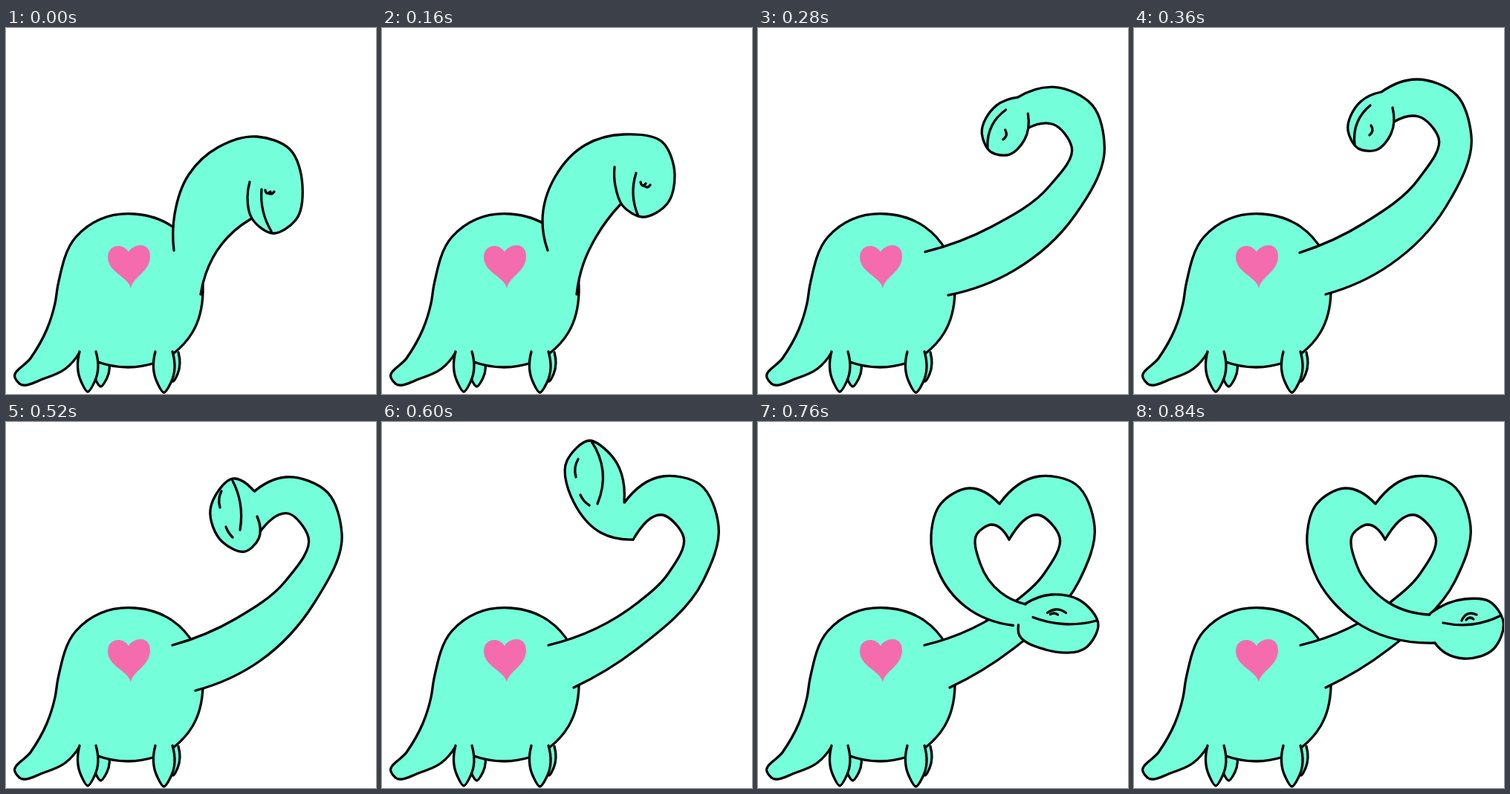
These frames come from a looping animation (498 px wide and 492 px high, 1.4 s). An HTML page:

```html
<!DOCTYPE html>
<html lang="en">
<head>
<meta charset="utf-8">
<title>Dinosaur heart</title>
<style>
html, body { margin: 0; width: 100%; height: 100%; overflow: hidden; background: #fff; }
svg { display: block; width: 100%; height: 100%; }
.skin { fill: #74ffda; stroke: #74ffda; stroke-width: 1; }
.line { fill: none; stroke: #000; stroke-width: 3.3; stroke-linecap: round; stroke-linejoin: round; }
</style>
</head>
<body>
<svg viewBox="0 0 498 492">
  <g id="body"></g>
  <g id="neck"></g>
  <path fill="#f46cae" d="M168 350C165 334 137 329 137 308C137 291 157 288 165 301C172 289 194 287 194 307C194 328 170 335 168 350Z"/>
</svg>
<script>
const LOOP = 1400;

const points = text => text.split(' ').map(p => p.split(',').map(Number));
const mix = (a, b, t) => a.map((v, i) => v + (b[i] - v) * t);
const add = (a, b, k) => a.map((v, i) => v + b[i] * k);

// Smooth curve through key points; tangents follow the chord lengths.
function spline(pts) {
  const n = pts.length - 1;
  const h = [], slope = [];
  for (let i = 0; i < n; i++) {
    const d = add(pts[i + 1], pts[i], -1);
    h[i] = Math.hypot(...d) || 1;
    slope[i] = d.map(v => v / h[i]);
  }
  const tan = pts.map((p, i) =>
    i && i < n ? mix(slope[i - 1], slope[i], h[i - 1] / (h[i - 1] + h[i])) : null);
  tan[0] = mix(tan[1], slope[0], 2);
  tan[n] = mix(tan[n - 1], slope[n - 1], 2);
  return h.map((len, i) =>
    `C${add(pts[i], tan[i], len / 3)} ${add(pts[i + 1], tan[i + 1], -len / 3)} ${pts[i + 1]}`).join('');
}

const stroke = pts => `<path class="line" d="M${pts[0]}${spline(pts)}"/>`;

// A part is a list of curves: joined for the fill, stroked one by one.
function drawPart(curves) {
  const d = curves.map((c, i) => (i ? 'L' : 'M') + c[0] + spline(c)).join('');
  return `<path class="skin" d="${d}Z"/>` + curves.map(stroke).join('');
}

const pose = (parts, marks) => ({
  parts: parts.map(p => p.map(points)),
  marks: marks.map(points)
});

const mapPoints = (v, fn) => Array.isArray(v[0]) ? v.map(w => mapPoints(w, fn)) : fn(v);

const mid = (a, b) => Array.isArray(a) ? a.map((v, i) => mid(v, b[i])) : (a + b) / 2;

const between = (p, q) => ({ parts: mid(p.parts, q.parts), marks: mid(p.marks, q.marks) });

// Swing a whole pose around the shoulder.
function turn(p, degrees) {
  const a = degrees * Math.PI / 180, cx = 240, cy = 330;
  const spin = ([x, y]) => [
    cx + (x - cx) * Math.cos(a) - (y - cy) * Math.sin(a),
    cy + (x - cx) * Math.sin(a) + (y - cy) * Math.cos(a)
  ];
  return { parts: mapPoints(p.parts, spin), marks: mapPoints(p.marks, spin) };
}

const render = p => p.parts.map(drawPart).join('') + p.marks.map(stroke).join('');

const leg = (x, y, w, h) => drawPart([
  [[0, 0], [.1, .75], [.5, 1], [.92, .75], [1, 0]].map(([u, v]) => [x + u * w, y + v * h])
]);

const torso = [
  '99,436 80,458 52,471 18,478 12,470 33,444 55,405 66,370 70,345 94,281 127,257 173,250 224,267 253,299 265,355 251,409 226,437',
  '201,450 165,456 121,448'
].map(points);

const rest = pose([[
  '226,299 227,250 246,197 286,160 338,146 382,163 399,212 390,258 360,276 331,256 325,228 328,207',
  '329,257 290,291 269,330 262,358'
]], ['344,217 346,246 357,273', '349,218 351,222 356,220', '353,222 357,223 361,220']);

const lean = pose([[
  '223,299 216,258 233,200 274,157 325,143 377,153 394,197 384,236 350,254 324,239 314,212 313,187',
  '321,237 288,281 271,317 262,358'
]], ['342,195 338,223 345,253', '348,207 351,212 355,209', '353,212 357,214 361,211']);

const swing = pose([[
  '222,300 290,293 372,265',
  '368,268 402,225 416,180 432,163 456,189 465,225 449,284 388,329 363,312 361,296',
  '376,328 335,355 290,363 259,357'
]], ['432,163 436,215 416,268', '373,285 377,278 383,275', '400,256 403,249 410,243']);

const curl = pose([
  ['258,358 345,318 420,240 454,145 434,90 380,69 333,86',
   '350,126 383,119 410,148 383,203 310,262 223,302'],
  ['333,86 305,99 288,138 302,162 326,164 346,142 348,107']
], ['318,104 301,126 297,157', '319,131 321,138 317,144']);

const lookUp = pose([
  ['255,361 342,321 415,243 452,150 433,95 377,74 330,97',
   '340,150 380,123 407,155 376,214 310,264 224,300'],
  ['334,93 308,76 275,118 291,161 322,174 340,157 338,127']
], ['305,79 315,108 315,145', '296,141 300,149 305,155', '290,93 287,102 288,115']);

// Right side of the heart, running on behind the left side.
const right = [
  '258,357 342,306 432,214 453,140 428,84 378,73 325,110',
  '338,158 378,125 406,155 385,204 344,243 224,300'
];
const left = '325,110 284,89 246,110 ';
const inside = ' 295,150 314,138 338,158';

const crest = pose([
  right,
  ['326,108 306,42 280,25 249,52 262,115 295,149 338,158']
], ['282,26 297,66 290,110', '267,98 272,106 279,112', '264,50 260,61 261,74']);

const drop = pose([right, [
  left + '235,130',
  '235,130 214,170 228,217 262,224 290,198 294,165',
  '294,165' + inside
]], ['232,218 232,185 240,156', '262,172 265,180 261,188', '256,174 258,180 255,185']);

const cross = pose([right, [
  left + '233,152 243,200 262,229 282,250',
  '296,249 281,255 330,294 401,300 419,277 388,238 345,226 320,232',
  '322,231 310,215 298,187' + inside
]], ['324,255 366,271 418,274', '338,246 352,246 368,254', '340,251 345,251 350,253']);

const done = pose([right, [
  left + '233,152 243,203 296,267 405,297',
  '405,297 420,311 444,318 484,305 497,268 478,241 445,238 399,257',
  '398,259 343,243 300,193' + inside
]], ['416,270 455,272 494,260', '441,267 449,258 461,259', '447,266 452,263 457,265']);

const timeline = [
  [0, rest], [80, between(rest, lean)], [160, lean], [240, swing], [280, turn(curl, 4)],
  [360, curl], [440, between(curl, lookUp)], [520, lookUp], [560, between(lookUp, crest)],
  [600, crest], [640, drop], [680, cross], [760, between(cross, done)], [840, done]
];

document.getElementById('body').innerHTML =
  leg(118, 440, 19, 42) + leg(218, 436, 14, 39) +
  drawPart(torso) +
  leg(99, 435, 22, 54) + leg(201, 435, 23, 55);

const neck = document.getElementById('neck');
let shown = null;

function update(time) {
  const t = time % LOOP;
  const current = timeline.filter(([start]) => start <= t).pop()[1];
  if (current === shown) return;
  shown = current;
  neck.innerHTML = render(current);
}

const begin = performance.now();
update(0);

function tick() {
  update(Math.max(0, performance.now() - begin));
  requestAnimationFrame(tick);
}
requestAnimationFrame(tick);
</script>
</body>
</html>
```
